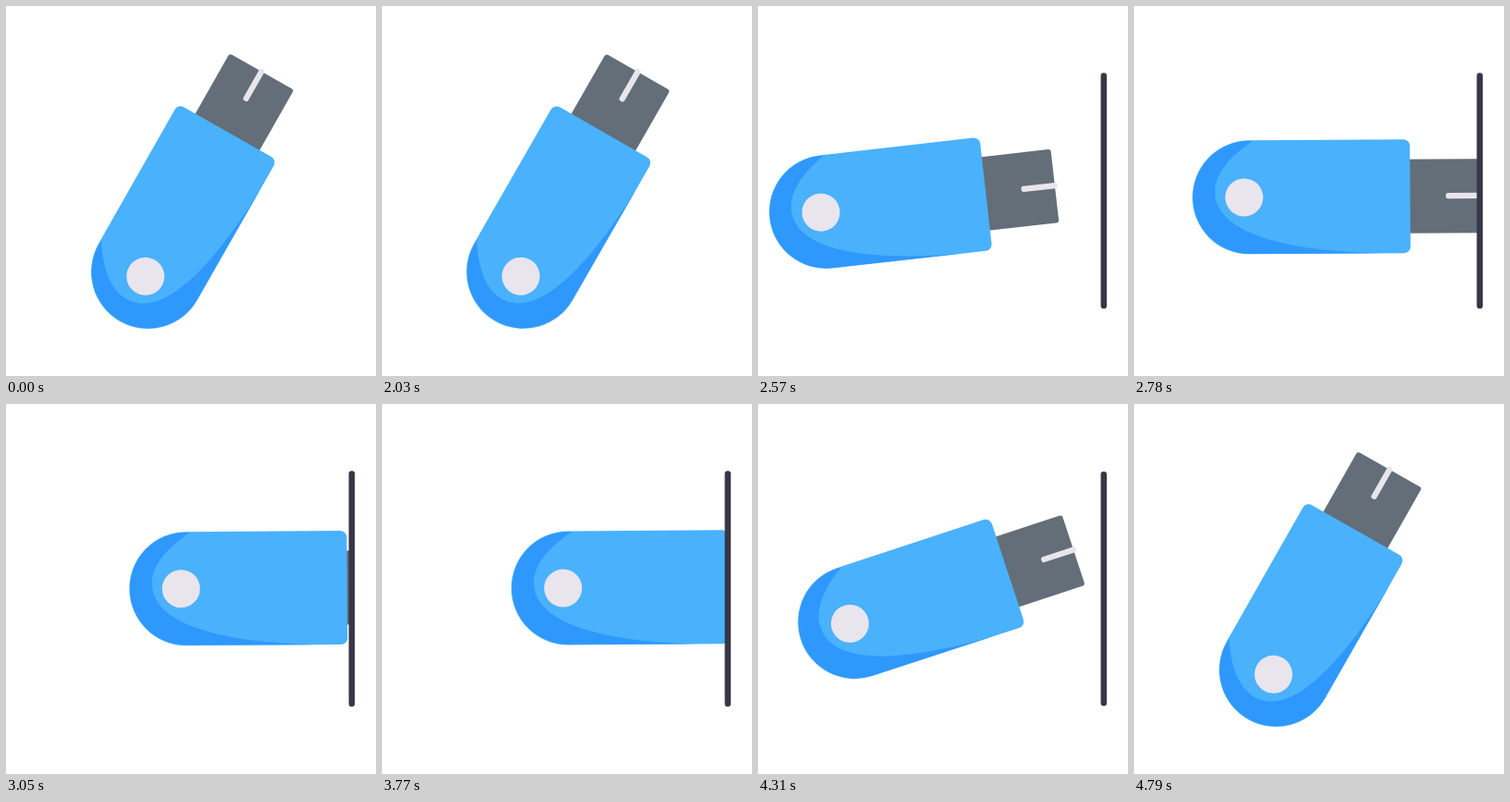
Recreate the animation shown at these times as an HTML page. Size 400 by 400 pixels, loop 4.82 s.

```html
<!DOCTYPE html>
<html>
<head>
<meta charset="utf-8">
<title>USB stick</title>
<style>
  html, body { margin: 0; height: 100%; overflow: hidden; background: #fff; }
  svg { display: block; width: 100vw; height: 100vh; }
</style>
</head>
<body>
<svg viewBox="0 0 400 400">
  <clipPath id="room"><rect width="374" height="400"/></clipPath>
  <g clip-path="url(#room)">
    <g id="stick">
      <rect x="160" y="-40" width="89" height="80" rx="3" fill="#636e78"/>
      <rect x="212.5" y="-3.4" width="39.5" height="6.2" rx="2.6" fill="#e9e5ed"/>
      <path fill="#4ab1fc" d="M0-61.5H167a7 7 0 0 1 7 7V54.5a7 7 0 0 1-7 7H0A61.5 61.5 0 0 1 0-61.5Z"/>
      <path fill="#2f98fd" d="M4.6-61L0-60.8A60.8 60.8 0 0 0 0 60.8L140 61.5C30 58-37 36-37-6C-37-26-20-45 4.6-61Z"/>
      <circle cx="-5.5" r="20.5" fill="#e9e5ed"/>
    </g>
  </g>
  <path id="wall" fill="none" stroke="#383747" stroke-width="6.5" stroke-linecap="round"/>
</svg>
<script>
const LOOP = 4820;
const stick = document.getElementById('stick');
const wall = document.getElementById('wall');

// Eased progress from 0 to 1 between two times
function ramp(t, from, to) {
  const u = Math.min(1, Math.max(0, (t - from) / (to - from)));
  return u * u * (3 - 2 * u);
}

function draw(t) {
  const windUp = ramp(t, 2005, 2480);
  const push = ramp(t, 2480, 3140);
  const pull = ramp(t, 3750, 4450);
  const settle = ramp(t, 4450, 4780);
  const hop = Math.sin(Math.PI * settle);

  const x = 199.3 - 35.8 * windUp + 136 * push - 114.5 * pull + 14.3 * settle;
  const y = 200.8 + 8.4 * windUp - 13.9 * push + 7.7 * pull - 2.2 * settle - 5.5 * hop;

  // Tips level, then swings back a little too far and recovers
  const angle = -60.4 + 60 * ramp(t, 2005, 2710) - 64.6 * ramp(t, 4132, 4650) + 4.6 * ramp(t, 4650, 4780);
  stick.setAttribute('transform', `translate(${x} ${y}) rotate(${angle}) translate(-98 3)`);

  const half = 124.3 * (ramp(t, 2080, 2580) - ramp(t, 4290, 4740));
  wall.setAttribute('d', half > 0 ? `M373.8 ${199.8 - half}V${199.8 + half}` : '');
}

const start = performance.now();
function tick() {
  draw((performance.now() - start) % LOOP);
  requestAnimationFrame(tick);
}
tick();
</script>
</body>
</html>
```
